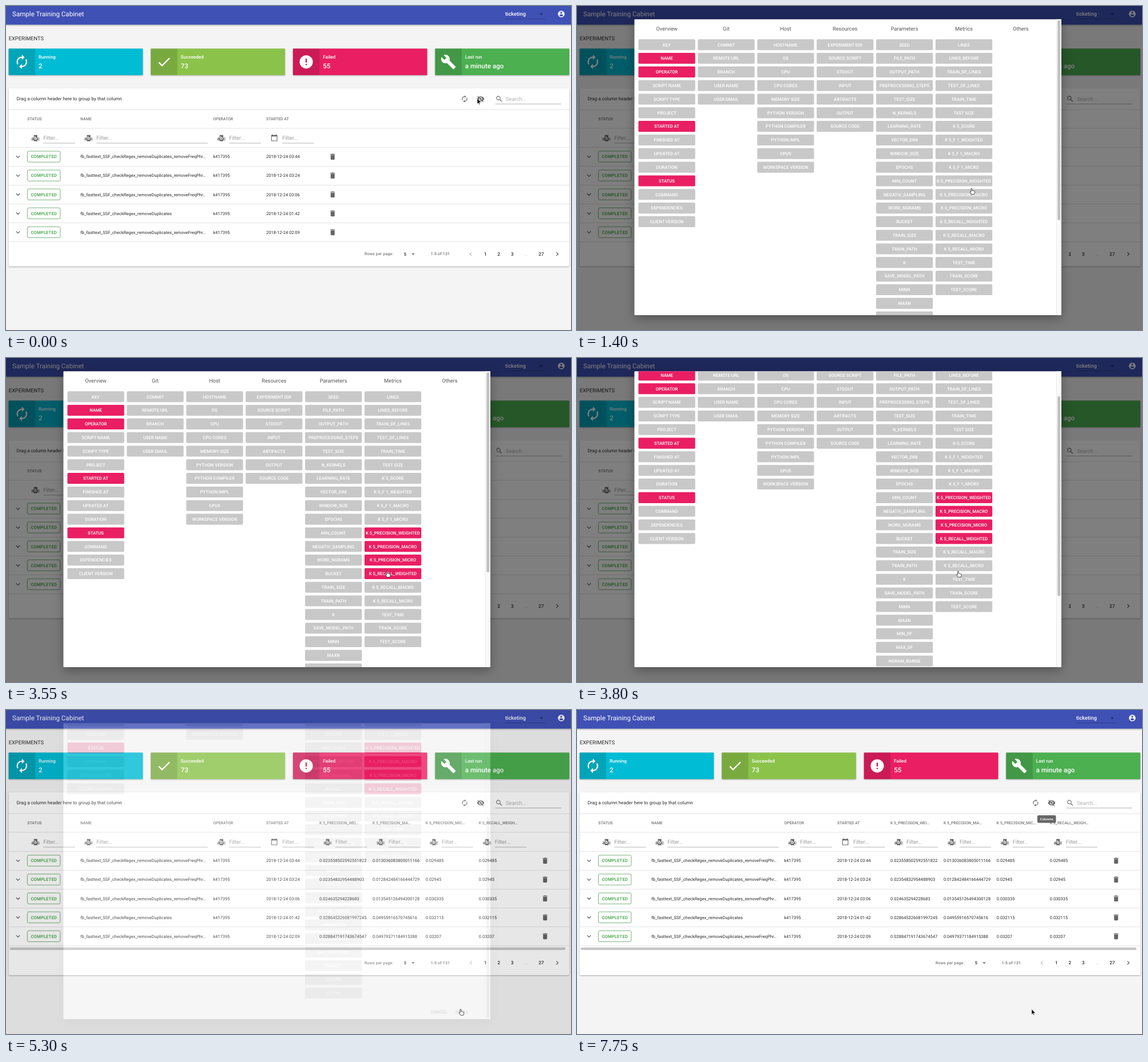
An HTML page for the animation above (7.85 s loop, 988 px wide and 567 px high).

```html
<!DOCTYPE html>
<html lang="en">
<head>
<meta charset="utf-8">
<title>Experiments</title>
<style>
  html, body { margin: 0; width: 100%; height: 100%; overflow: hidden; background: #f4f4f4; }
  svg { display: block; width: 100%; height: 100%; }
  text { font-family: Roboto, sans-serif; text-rendering: geometricPrecision; white-space: pre; }
  .card { filter: drop-shadow(0 1px 1px rgba(0, 0, 0, .3)); }
  .bar { filter: drop-shadow(0 1.5px 1.5px rgba(0, 0, 0, .35)); }
  .paper { filter: drop-shadow(0 6px 9px rgba(0, 0, 0, .3)); }
</style>
</head>
<body>
<svg id="stage" viewBox="0 0 988 567" xmlns="http://www.w3.org/2000/svg"></svg>
<script>
const LOOP = 7850;
const GREY = '#757575', INK = '#2b2b2b', PINK = [233, 30, 99], OFF = [200, 200, 200];

const ICONS = {
  cycle: 'M12 6v3l4-4-4-4v3c-4.42 0-8 3.58-8 8 0 1.57.46 3.03 1.24 4.26L6.7 14.8c-.45-.83-.7-1.79-.7-2.8 0-3.31 2.69-6 6-6zm6.76 1.74L17.3 9.2c.44.84.7 1.79.7 2.8 0 3.31-2.69 6-6 6v-3l-4 4 4 4v-3c4.42 0 8-3.58 8-8 0-1.57-.46-3.03-1.24-4.26z',
  done: 'M9 16.2L4.8 12l-1.4 1.4L9 19 21 7l-1.4-1.4z',
  error: 'M12 2a10 10 0 1 0 0 20 10 10 0 1 0 0-20zm1 15h-2v-2h2zm0-4h-2V7h2z',
  build: 'M22.7 19l-9.1-9.1c.9-2.3.4-5-1.5-6.9-2-2-5-2.4-7.4-1.3L9 6 6 9 1.6 4.7C.4 7.1.9 10.1 2.9 12.1c1.9 1.9 4.6 2.4 6.9 1.5l9.1 9.1c.4.4 1 .4 1.4 0l2.3-2.3c.5-.4.5-1.1.1-1.4z',
  hidden: 'M1 12A11.8 11.8 0 0 1 23 12 11.8 11.8 0 0 1 1 12zM7 12a5 5 0 1 0 10 0 5 5 0 1 0-10 0zM9 12a3 3 0 1 1 6 0 3 3 0 1 1-6 0zM2 4.3L3.3 3 21 20.7 19.7 22z',
  search: 'M15.5 14h-.8l-.3-.3a6.5 6.5 0 1 0-.7.7l.3.3v.8l5 5 1.5-1.5zm-6 0a4.5 4.5 0 1 1 0-9 4.5 4.5 0 1 1 0 9z',
  bin: 'M6 19c0 1.1.9 2 2 2h8c1.1 0 2-.9 2-2V7H6zM19 4h-3.5l-1-1h-5l-1 1H5v2h14z',
  expand: 'M16.59 8.59L12 13.17 7.41 8.59 6 10l6 6 6-6z',
  drop: 'M7 10l5 5 5-5z',
  prev: 'M15.41 7.41L14 6l-6 6 6 6 1.41-1.41L10.83 12z',
  next: 'M10 6L8.59 7.41 13.17 12l-4.58 4.59L10 18l6-6z',
  date: 'M20 3h-1V1h-2v2H7V1H5v2H4c-1.1 0-2 .9-2 2v16c0 1.1.9 2 2 2h16c1.1 0 2-.9 2-2V5c0-1.1-.9-2-2-2zm0 18H4V8h16z',
  user: 'M12 2a10 10 0 1 0 0 20 10 10 0 1 0 0-20zm0 3a3 3 0 1 1 0 6 3 3 0 1 1 0-6zm0 14.2c-2.5 0-4.7-1.3-6-3.2 0-2 4-3.1 6-3.1s6 1.1 6 3.1c-1.3 1.9-3.5 3.2-6 3.2z'
};

const rect = (x, y, w, h, fill, more = '') =>
  `<rect x="${x}" y="${y}" width="${w}" height="${h}" fill="${fill}" ${more}/>`;
const line = (x1, x2, y, color) => rect(x1, y - .3, x2 - x1, .6, color);
// Text is centred vertically on y by its cap height.
const text = (x, y, str, size, fill = INK, weight = 400, more = '') =>
  `<text x="${x}" y="${y + size * .355}" font-size="${size}" fill="${fill}" font-weight="${weight}" ${more}>${str}</text>`;
const icon = (name, x, y, fill = GREY, size = 14) =>
  `<path d="${ICONS[name]}" fill="${fill}" transform="translate(${x - size / 2} ${y - size / 2}) scale(${size / 24})"/>`;
const MID = 'text-anchor="middle"', WIDE = 'letter-spacing=".03em"';

function header() {
  return rect(0, 0, 988, 32.6, '#3f51b5', 'class="bar"') +
    text(11, 14, 'Sample Training Cabinet', 11.6, '#fff') +
    text(873, 14, 'ticketing', 9.28, '#fff', 500) +
    icon('drop', 936, 14, 'rgba(0,0,0,.5)') + line(873, 943, 22.5, 'rgba(0,0,0,.4)') +
    icon('user', 971, 14, '#fff');
}

function tiles() {
  return [
    ['Running', '2', '#00bcd4', 'cycle'],
    ['Succeeded', '73', '#8bc34a', 'done'],
    ['Failed', '55', '#e91e63', 'error'],
    ['Last run', 'a minute ago', '#4caf50', 'build']
  ].map(([label, value, color, name], i) => {
    const x = 4.6 + i * 248.6;
    return rect(x, 74.5, 234.7, 46.4, color, 'class="card" rx="1"') +
      rect(x, 74.5, 46.4, 46.4, 'rgba(0,0,0,.13)') +
      icon(name, x + 23.2, 97.8, '#fff', 27.8) +
      text(x + 52.4, 88.9, label, 8.12, '#fff', 500) +
      text(x + 52.4, 104.6, value, 11.6, '#fff', 500);
  }).join('');
}

const COL = 92.9;
const RUN = 'fb_fasttext_SSF_checkRegex_removeDuplicates', LONG = RUN + '_removeFreqPhr…';
const rows = [
  [LONG, '03:44', '0.023558502592551822', '0.013036083805011166', '0.029485'],
  [LONG, '03:24', '0.02354832954488903', '0.012842484166444729', '0.02945'],
  [LONG, '03:06', '0.024635294228683', '0.013545126494300128', '0.030335'],
  [RUN, '01:42', '0.028645326081997245', '0.04955916570745616', '0.032115'],
  [LONG, '02:09', '0.028847191743674547', '0.04979371184915388', '0.03207']
];
const extras = ['K 5_PRECISION_WEI…', 'K 5_PRECISION_MA…', 'K 5_PRECISION_MIC…', 'K 5_RECALL_WEIGH…'];

function column(x, title, width, isDate) {
  const c = x + 14;
  const mark = isDate ? icon('date', c, 230.5, '#666', 13) :
    text(c - 7, 231.6, 'a', 8.6, '#666', 700) + rect(c - 2.6, 225.8, 6.2, 10.8, '#666') +
    text(c + .5, 231.2, 'b', 8.2, '#fff', 700, MID) + text(c + 3.4, 231.6, 'c', 8.6, '#666', 700);
  return text(x, 197.4, title, 6.96, GREY, 500) + mark +
    text(x + 28, 230.5, 'Filter...', 9.28, '#9a9a9a') +
    line(x + 28, x + width - 9.4, 240, '#858585');
}

function table(wide) {
  const dy = wide ? 8.4 : 0;
  let s = rect(4.6, 144, 980.6, 311.5 + dy, '#fff', 'class="card" rx="2"') +
    text(18.4, 162.6, 'Drag a column header here to group by that column', 8.12) +
    icon('cycle', 802, 162.6, '#666') +
    '<circle class="hover" cx="830" cy="162.6" r="13.9" opacity="0"/>' + icon('hidden', 830, 162.6, '#666') +
    icon('search', 862.5, 162.6, '#666') + text(874, 162.6, 'Search...', 9.28, '#b0b0b0') +
    line(855.5, 971, 171.6, '#858585');
  s += line(4.6, 985.2, 181.4, '#d2d2d2') + line(4.6, 985.2, 214, '#d2d2d2');
  s += column(37.2, 'STATUS', COL) + column(130, 'NAME', 232.2) +
    column(362.2, 'OPERATOR', COL) + column(455.1, 'STARTED AT', COL, true);
  if (wide) extras.forEach((e, i) => s += column(548 + i * COL, e, COL));

  rows.forEach(([name, time, a, b, c], i) => {
    const y = 263.7 + i * 33.07;
    const cell = (x, str) => text(x, y, str, 7.54);
    s += line(4.6, 985.2, y - 16.4, '#d2d2d2') + icon('expand', 21, y, '#555') +
      rect(37.4, y - 9.7, 57.4, 19.2, 'none', 'rx="2.3" stroke="#5a9e5c" stroke-width=".8"') +
      text(66.2, y, 'COMPLETED', 7.54, '#35a33a', 500, MID + ' letter-spacing=".028em"') +
      cell(130, name) + cell(362.2, 'k417395') + cell(455.1, '2018-12-24 ' + time);
    if (wide) [a, b, c, c].forEach((v, k) => s += cell(548 + k * COL, v));
    s += icon('bin', wide ? 942.7 : 571.2, y, '#666');
  });
  s += line(4.6, 985.2, 412.7, '#d2d2d2');
  if (wide) s += rect(6.4, 415.4, 972, 4.6, '#c8c8c8', 'rx="2.3"');

  const y = 434 + dy;
  s += text(627, y, 'Rows per page:', 6.96, '#555', 400, WIDE) + text(695.8, y, '5', 7.54, INK, 500) +
    icon('drop', 712, y) + text(742.8, y, '1-5 of 131', 6.96, '#444', 400, WIDE) +
    icon('prev', 813, y, '#bbb') + icon('next', 964, y, '#555');
  [['1', 838.5], ['2', 862], ['3', 885.4], ['27', 936]].forEach(([n, x]) =>
    s += text(x, y, n, 8.12, INK, 500, MID + ' ' + WIDE));
  return s + text(909.5, y, '…', 8.12, '#bbb', 400, MID);
}

const groups = {
  Overview: 'KEY,NAME,OPERATOR,SCRIPT NAME,SCRIPT TYPE,PROJECT,STARTED AT,FINISHED AT,UPDATED AT,DURATION,STATUS,COMMAND,DEPENDENCIES,CLIENT VERSION',
  Git: 'COMMIT,REMOTE URL,BRANCH,USER NAME,USER EMAIL',
  Host: 'HOSTNAME,OS,CPU,CPU CORES,MEMORY SIZE,PYTHON VERSION,PYTHON COMPILER,PYTHON IMPL,GPUS,WORKSPACE VERSION',
  Resources: 'EXPERIMENT DIR,SOURCE SCRIPT,STDOUT,INPUT,ARTIFACTS,OUTPUT,SOURCE CODE',
  Parameters: 'SEED,FILE_PATH,OUTPUT_PATH,PREPROCESSING_STEPS,TEST_SIZE,N_KERNELS,LEARNING_RATE,VECTOR_DIM,WINDOW_SIZE,EPOCHS,MIN_COUNT,NEGATIV_SAMPLING,WORD_NGRAMS,BUCKET,TRAIN_SIZE,TRAIN_PATH,K,SAVE_MODEL_PATH,MINN,MAXN,MIN_DF,MAX_DF,NGRAM_RANGE,LOWERCASE,STOP_WORDS,MAX_FEATURES,PENALTY,SOLVER,ALPHA',
  Metrics: 'LINES,LINES_BEFORE,TRAIN_DF_LINES,TEST_DF_LINES,TRAIN_TIME,TEST SIZE,K 5_SCORE,K 5_F 1_WEIGHTED,K 5_F 1_MACRO,K 5_F 1_MICRO,K 5_PRECISION_WEIGHTED,K 5_PRECISION_MACRO,K 5_PRECISION_MICRO,K 5_RECALL_WEIGHTED,K 5_RECALL_MACRO,K 5_RECALL_MICRO,TEST_TIME,TRAIN_SCORE,TEST_SCORE'
};
const chosen = ['NAME', 'OPERATOR', 'STARTED AT', 'STATUS'];
const clicks = { 'K 5_PRECISION_WEIGHTED': 1800, 'K 5_PRECISION_MACRO': 2300, 'K 5_PRECISION_MICRO': 2880, 'K 5_RECALL_WEIGHTED': 3250 };

function dialog() {
  let s = '';
  Object.entries(groups).forEach(([title, list], i) => {
    const x = 107.4 + i * 103.9, mid = x + 49.6;
    s += text(mid, 39.3, title, 9.28, '#555', 400, MID);
    list.split(',').forEach((item, j) => {
      const y = 67.8 + j * 23.82, on = chosen.includes(item);
      s += rect(x, y - 9.6, 99.3, 19.1, `rgb(${on ? PINK : OFF})`, `rx="1.8" data-item="${item}"`) +
        text(mid, y, item, 7.7, '#fff', 500, MID);
    });
  });
  s += text(776, 39.3, 'Others', 9.28, '#555', 400, MID) +
    text(757, 767.5, 'CANCEL', 7.7, '#666', 500, MID) + text(797, 767.5, 'APPLY', 7.7, '#666', 500, MID);
  return rect(0, 0, 988, 567, 'rgba(0,0,0,.5)') +
    rect(100.4, 23.2, 746.6, 517.8, '#fff', 'class="paper" rx="1"') +
    `<g clip-path="url(#view)"><g id="list">${s}</g></g>` +
    rect(838.2, 23.2, 8.8, 517.8, '#fafafa') + rect(838, 23.2, .6, 517.8, '#e2e2e2') +
    rect(840.3, 25, 5, 350, '#c1c1c1', 'id="thumb" rx="2.5"');
}

const stage = document.getElementById('stage');
stage.innerHTML =
  '<defs><clipPath id="view"><rect x="100.4" y="23.2" width="738" height="517.8"/></clipPath></defs>' +
  rect(0, 0, 988, 567, '#f4f4f4') + header() +
  text(4.8, 56.5, 'EXPERIMENTS', 9.28) + tiles() +
  `<g id="narrow">${table(false)}</g><g id="wide">${table(true)}</g>` +
  `<g id="dialog">${dialog()}</g>` +
  `<g id="tip">${rect(805, 184.2, 32.5, 13.2, '#666', 'rx="2"')}${text(821.2, 190.9, 'Columns', 5.8, '#fff', 500, MID)}</g>` +
  '<path id="arrow" d="M0 0V9.4L2.2 7.4 3.6 10.7 5 10.1 3.6 6.9H6.6Z" fill="#000" stroke="#fff" stroke-width=".6"/>' +
  '<path id="hand" d="M-1 1C-1-.3 .9-.3 .9 1V4.2C1.3 3.6 2.6 3.8 2.7 4.6 3.2 4.1 4.2 4.3 4.3 5 4.9 4.6 5.6 5 5.6 5.7V8L4.8 10.6H0L-2.4 7.4C-3.2 6.2-2 5.5-1 6.6Z" fill="#fff" stroke="#222" stroke-width=".8"/>';

const $ = id => document.getElementById(id);
const [narrow, wide, modal, list, thumb, tip, arrow, hand] =
  ['narrow', 'wide', 'dialog', 'list', 'thumb', 'tip', 'arrow', 'hand'].map($);
const hover = narrow.querySelector('.hover');
const toggles = Object.entries(clicks).map(([item, at]) => [stage.querySelector(`[data-item="${item}"]`), at]);

// Eased progress from 0 to 1 between two times.
const ease = (t, from, to) => {
  const p = Math.min(1, Math.max(0, (t - from) / (to - from)));
  return p * p * (3 - 2 * p);
};
const show = (el, on) => el.setAttribute('display', on ? 'inline' : 'none');

// Pointer tip: time, x, y
const path = [
  [250, 824, 162], [500, 827, 162], [850, 827, 162], [1350, 690, 319], [1400, 690, 319],
  [1600, 690, 311], [1880, 690, 311], [2200, 681, 330], [2480, 681, 330], [2750, 673.5, 346.5],
  [2950, 673.5, 346.5], [3200, 666.5, 373], [4450, 666.5, 373], [5000, 795, 523.5]
];
function pointer(t) {
  let [, x, y] = path[0];
  for (let i = 1; i < path.length; i++) {
    const k = ease(t, path[i - 1][0], path[i][0]);
    x += (path[i][1] - path[i - 1][1]) * k;
    y += (path[i][2] - path[i - 1][2]) * k;
  }
  return [x, y];
}

const OPEN = 685, CLOSE = 5160;
function draw(t) {
  const closed = t >= CLOSE;
  show(narrow, !closed);
  show(wide, closed);
  hover.setAttribute('opacity', .1 * ease(t, 250, 450) * (1 - ease(t, 850, 1000)));

  const fade = ease(t, OPEN, OPEN + 225) - ease(t, CLOSE, CLOSE + 195);
  show(modal, fade > 0);
  modal.setAttribute('opacity', fade);
  const scroll = 239.5 * ease(t, 3600, 4206);
  list.setAttribute('transform', `translate(0 ${-scroll})`);
  thumb.setAttribute('y', 25 + scroll * .68);
  toggles.forEach(([el, at]) => {
    const k = ease(t, at, at + 200);
    el.setAttribute('fill', `rgb(${OFF.map((c, i) => Math.round(c + (PINK[i] - c) * k))})`);
  });

  tip.setAttribute('opacity', ease(t, 670, 740) - ease(t, 900, 1000) + ease(t, 5400, 5480));

  const [x, y] = pointer(t);
  const over = t > 1100 && t < CLOSE + 200 && (x < 726 || y > 515);
  show(hand, over);
  show(arrow, !over);
  (over ? hand : arrow).setAttribute('transform', `translate(${x} ${y})`);
}

const start = performance.now();
function tick() {
  draw((performance.now() - start) % LOOP);
  requestAnimationFrame(tick);
}
tick();
</script>
</body>
</html>
```
